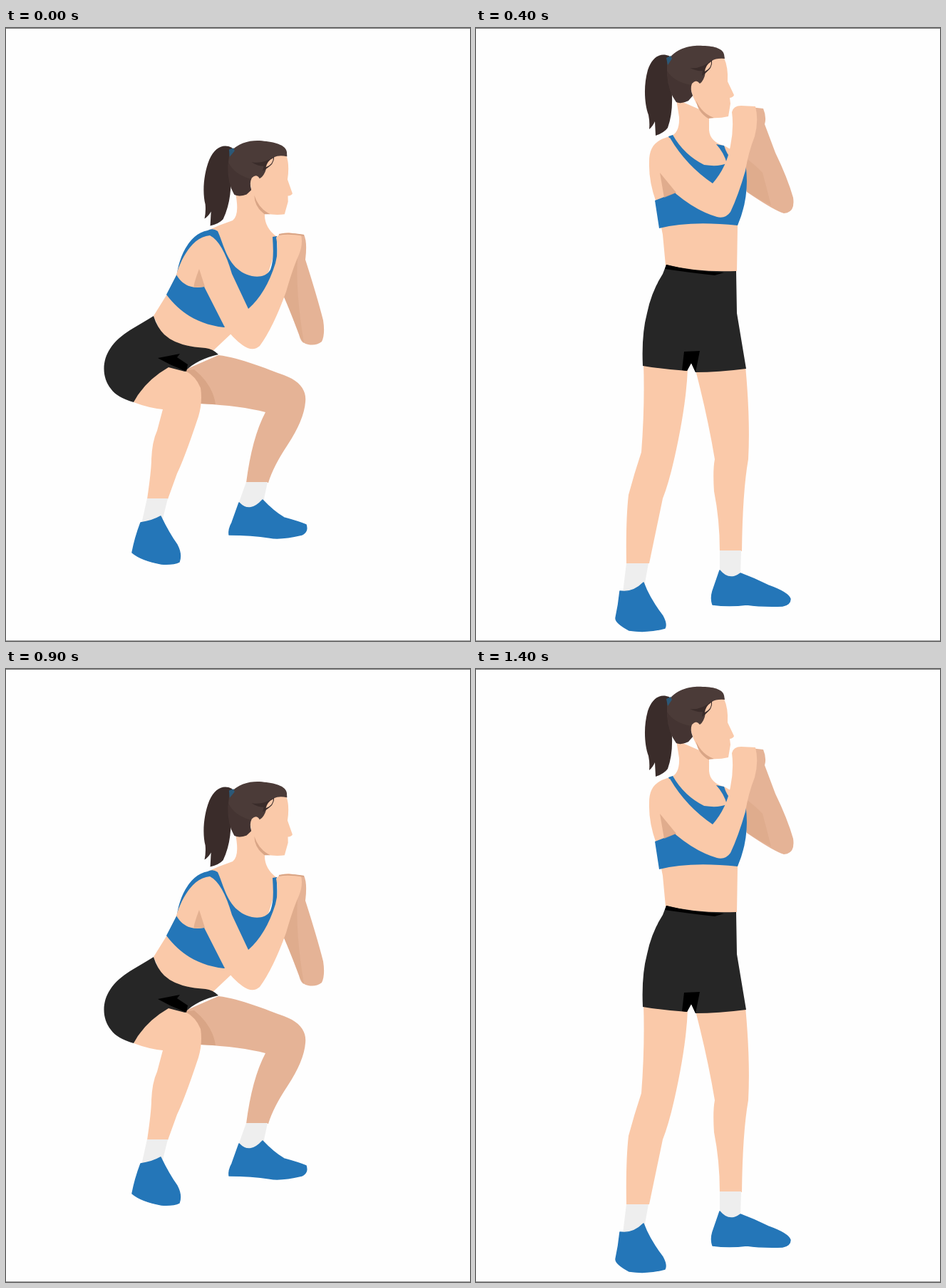
Animation, 651 px wide and 860 px high, one loop 1500 ms. Source, as an HTML page:

```html
<!DOCTYPE html>
<html lang="en">
<head>
<meta charset="utf-8">
<title>Squat exercise</title>
<style>
  html, body { margin: 0; width: 100%; height: 100%; overflow: hidden; background: #fefefe; }
  svg { display: block; }
  #squat, #stand { filter: blur(.7px); }
  .skin { fill: #fac9a9; }
  .far { fill: #e5b396; }
  .shade { fill: #d9a586; }
  .blue { fill: #2476b8; }
  .shoe { fill: #2476b8; stroke: #2476b8; stroke-width: 1.5; stroke-linejoin: round; }
  .cloth { fill: #262626; }
  .sock { fill: #eee; }
  .hair { fill: #4b3b38; }
  .tail { fill: #3a2c2a; }
</style>
</head>
<body>
<svg width="651" height="860" viewBox="0 0 651 860">
  <defs>
    <g id="head">
      <path class="tail" d="M271 39C258 34 247 41 241 59C235 80 236 106 242 122Q244 132 243 142Q248 138 251 131L252 151Q264 147 269 140Q276 120 275 95L273 45Z"/>
      <path class="skin" d="M300 80L316 42L348 42Q354 55 353 75L362 94Q361 97 356 98L357 106L354 124Q342 127 328 126Q312 116 304 95Z"/>
      <path class="shade" d="M309 102Q317 120 334 126L326 127Q311 118 309 102Z"/>
      <path class="hair" d="M268 46C282 27 302 24 318 25C336 25 347 30 348 37L349 43Q337 42 331 46Q332 57 322 62Q320 74 314 78Q309 71 303 78Q300 85 304 95L298 102Q288 107 281 104Q270 90 268 65Z"/>
      <path class="tail" d="M268 60Q278 76 302 80Q300 87 304 95L298 102Q288 107 281 104Q270 90 268 60Z" opacity=".4"/>
      <path class="tail" d="M300 56Q316 58 331 45Q332 57 317 67L318 60Q310 61 300 56Z"/>
      <path class="skin" d="M321 61Q322 52 330 47Q331 56 321 61Z"/>
      <path d="M267 42L273 39L275 43L269 52Z" fill="#2b5877"/>
    </g>
  </defs>

  <g id="squat">
    <path class="far" d="M397 288L418 290Q423 300 420 325Q436 375 445 410Q448 430 443 440Q435 446 424 444Q416 443 413 435Q398 395 389 375L405 330Z"/>
    <path class="shade" d="M389 375L409 322Q406 370 418 442Q413 440 411 430Q398 395 389 375Z" opacity=".5"/>
    <path class="skin" d="M322 232Q328 262 318 270Q300 276 283 284Q255 305 245 335L225 375L207 404L225 445L285 458L320 425L345 390Q375 340 380 293Q362 280 363 260L345 225Z"/>
    <path class="blue" d="M283 284Q290 280 297 285C304 300 309 325 325 338C338 350 363 354 371 339C376 325 375 310 374 293L380 292L381 335Q370 370 340 395L306 420C270 416 245 400 225 374L240 345C243 320 258 288 283 284Z"/>
    <path class="skin" d="M286 291Q304 300 317 345L340 394Q365 372 378 330Q383 312 379 294Q384 287 397 287L414 290Q417 303 411 318Q403 335 393 370Q375 420 356 446Q346 455 332 445Q318 435 306 418L278 363C262 366 248 362 239 346C246 322 262 293 286 291Z"/>
    <path class="shade" d="M271 338Q262 362 264 364L279 363Z" opacity=".7"/>
    <path d="M383 290Q395 287 418 291" fill="none" stroke="#d9a586" stroke-width="2"/>
    <path class="far" d="M250 480L298 459C330 463 365 478 390 487C412 495 422 508 420 525Q418 550 395 585Q375 615 368 638H337Q345 575 364 539Q330 530 273 527Z"/>
    <path class="shade" d="M250 481L264 479Q290 500 294 528L272 527Z"/>
    <path class="skin" d="M179 525Q190 495 228 474Q262 478 273 505Q276 525 270 545Q250 605 240 625L227 661L198 661Q204 620 204 605Q205 580 212 565L220 535Q200 533 179 525Z"/>
    <path class="cloth" d="M207 404C186 418 160 428 146 450C134 468 135 491 147 506Q155 518 179 525Q195 495 228 476L251 482C262 470 280 462 298 458Q290 450 280 449Q240 447 222 430Q212 420 207 404Z"/>
    <path d="M213 463L244 457L240 462L255 472L253 482L230 472Z"/>
    <path class="sock" d="M198 660H227L220 688L190 696ZM337 637H367L361 665Q345 682 326 668Z"/>
    <path class="shoe" d="M189 694Q205 692 217 685Q228 708 240 725Q247 738 243 749Q235 753 218 752Q190 747 177 736Q181 715 189 694Z"/>
    <path class="shoe" d="M327 666Q342 682 360 662Q375 678 390 687Q412 693 421 697Q424 707 415 711Q385 718 370 715Q345 711 313 711Q312 703 317 694Z"/>
    <use href="#head" transform="translate(341.2 216.8) rotate(6) translate(-300 -85)"/>
  </g>

  <g id="stand">
    <path class="far" d="M385 111L403 113Q408 125 405 135L420 175Q437 210 445 238Q448 259 432 260Q418 256 380 230L375 185Z"/>
    <path class="shade" d="M378 182Q393 193 402 203Q408 225 414 249Q396 240 379 229Z" opacity=".5"/>
    <path class="skin" d="M281 100L285 125Q286 148 272 152C250 158 243 168 243 188Q242 215 253 245L262 290L266 333Q310 348 366 341L367 277L378 220Q378 180 350 166Q328 160 327 143V120Z"/>
    <path class="blue" d="M270 152L276 150Q292 178 320 192Q340 195 352 190Q348 175 337 163L348 165Q352 178 359 184L378 190Q385 235 367 277Q300 270 257 281L251 242L285 229L310 205Q282 183 270 152Z"/>
    <path class="skin" d="M272 154Q295 193 332 218Q352 195 357 165Q362 140 359 118Q361 109 372 109L392 110Q397 130 391 152Q382 175 378 200Q368 235 357 258Q350 268 338 265Q310 257 281 233L258 208Q240 165 272 154Z"/>
    <path class="shade" d="M258 203L281 231L264 238Z" opacity=".8"/>
    <path class="skin" d="M235 471L297 478Q295 530 278 605Q270 640 262 660L243 751H211Q210 690 214 655Q222 625 232 595Q237 530 235 471ZM308 480L378 474Q385 550 382 605Q374 650 373 734H342Q342 690 334 650Q332 620 335 605Q325 545 308 480Z"/>
    <path class="cloth" d="M267 332Q310 343 365 341L366 400L379 478Q340 483 308 483L302 470L296 481Q265 479 234 474Q232 430 240 400Q246 370 262 345Z"/>
    <path d="M267 332Q300 341 348 343L335 347Q298 343 265 338ZM292 454L314 453L308 483L302 470L296 481L289 480Z"/>
    <path class="sock" d="M211 751H242L236 784L206 792ZM342 733H372L371 768Q355 777 342 766Z"/>
    <path class="shoe" d="M202 790Q220 793 235 778Q243 800 262 825Q268 836 265 842Q240 849 215 845Q196 835 196 828Q200 810 202 790Z"/>
    <path class="shoe" d="M342 761Q355 777 371 765Q390 772 410 782Q438 792 441 801Q441 809 430 811Q400 812 380 809Q355 812 332 809Q329 800 332 790Z"/>
    <use href="#head"/>
  </g>

  <path d="M0 .5H651" stroke="#777"/>
  <path d="M0 859.5H651" stroke="#999"/>
</svg>
<script>
  const LOOP = 1500, HOLD = 400;
  const poses = ["squat", "stand"].map(id => document.getElementById(id));

  function draw(now) {
    const current = Math.floor(now % LOOP / HOLD) % poses.length;
    poses.forEach((pose, i) => pose.style.display = i === current ? "" : "none");
    requestAnimationFrame(draw);
  }
  draw(0);
</script>
</body>
</html>
```
